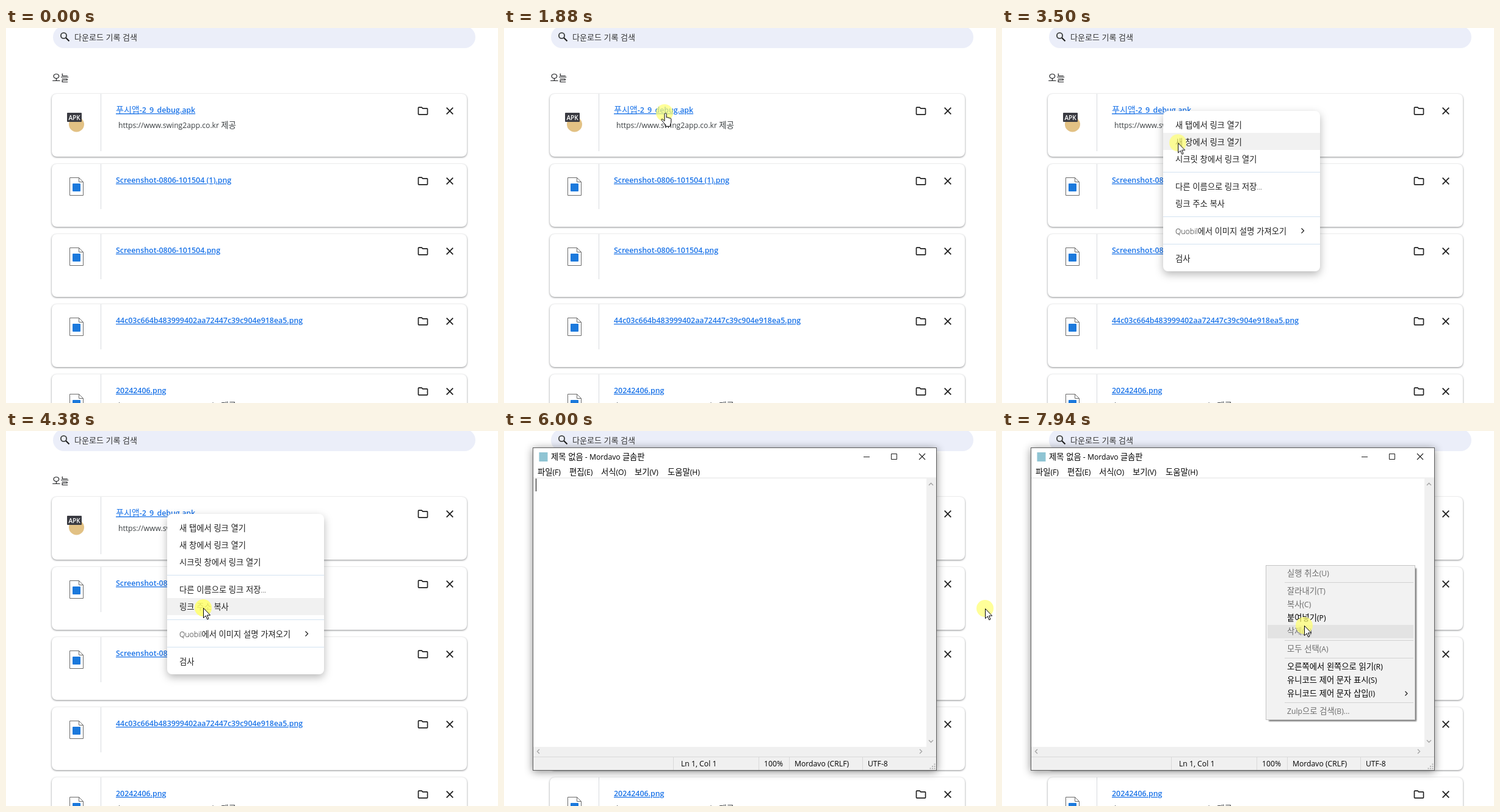
An HTML page for the animation above (8 s loop, 806 by 615 pixels).

```html
<!DOCTYPE html>
<html lang="ko">
<head>
<meta charset="utf-8">
<title>다운로드 기록</title>
<style>
  html, body { margin: 0; width: 100%; height: 100%; overflow: hidden; background: #fff; }
  svg { display: block; width: 100vw; height: 100vh; }
  text { font-family: 'Open Sans', 'Noto Sans', 'Noto Sans CJK KR', sans-serif; font-size: 12.2px; white-space: pre; }
  .ko { font-family: 'Noto Sans CJK KR', 'Noto Sans CJK', 'Noto Sans KR', sans-serif; }
  .light { font-weight: 300; }
  .link { fill: #1a73e8; font-weight: 600; font-size: 12.4px; text-decoration: underline; }
  .link .ko { font-weight: 400; }
  .card { fill: #fff; filter: drop-shadow(0 1px 1.6px rgba(60, 64, 67, .6)); }
  .line { fill: none; stroke: #1f1f1f; }
  .off { fill: #6d6d6d; }

  /* One loop is 8 s, so 1% is 80 ms. */
  .anim { animation: 8s linear infinite; }
  .hard { animation-timing-function: step-end; }
  #linkMenu { animation-name: linkMenu; }
  #linkHover { animation-name: linkHover; }
  #pad { animation-name: pad; }
  #caret { animation-name: caret; }
  #editMenu { animation-name: editMenu; }
  #editHover { animation-name: editHover; }
  #pointer { animation-name: pointer; }
  #arrow { animation-name: arrow; }
  #hand { animation-name: hand; }
  #beam { animation-name: beam; }
  #click { animation-name: click; }

  @keyframes linkMenu {
    0%, 28.85% { opacity: 0; }
    31.2%, 57.1% { opacity: 1; }
    60.95%, 100% { opacity: 0; }
  }
  @keyframes linkHover {
    0% { opacity: 0; transform: translateY(145px); }
    42.55% { opacity: 1; transform: translateY(145px); }
    43.3% { opacity: 1; transform: translateY(172px); }
    44.3% { opacity: 1; transform: translateY(200px); }
    46.5% { opacity: 1; transform: translateY(246px); }
    48.4%, 100% { opacity: 1; transform: translateY(274px); }
  }
  @keyframes pad { 0% { opacity: 0; } 75%, 100% { opacity: 1; } }
  @keyframes caret {
    0% { opacity: 1; }
    76.6% { opacity: 0; }
    83.2% { opacity: 1; }
    89.85%, 100% { opacity: 0; }
  }
  @keyframes editMenu { 0%, 92.2% { opacity: 0; } 93.9%, 100% { opacity: 1; } }
  @keyframes editHover {
    0% { opacity: 0; transform: translateY(223px); }
    95.1% { opacity: 1; transform: translateY(223px); }
    96.3% { opacity: 1; transform: translateY(251px); }
    97% { opacity: 1; transform: translateY(273px); }
    97.6% { opacity: 1; transform: translateY(295px); }
    98.8%, 100% { opacity: 1; transform: translateY(318px); }
  }
  @keyframes pointer {
    0% { opacity: 0; transform: translate(603px, 205px); }
    11.74% { opacity: 0; transform: translate(603px, 205px); }
    11.75% { opacity: 1; transform: translate(603px, 205px); animation-timing-function: cubic-bezier(.3, .2, .35, 1); }
    18.5% { transform: translate(257px, 142px); }
    19.5%, 23.45% { transform: translate(260px, 143px); }
    23.5%, 24.95% { transform: translate(263px, 139px); }
    25.75%, 33.6% { transform: translate(263px, 136px); }
    37.5%, 39.1% { transform: translate(271px, 134px); }
    39.12%, 42.2% { transform: translate(272px, 134px); }
    43.75% { transform: translate(288px, 188px); animation-timing-function: ease-out; }
    50.75%, 74.99% { transform: translate(323px, 290px); }
    75% { transform: translate(788px, 291px); animation-timing-function: ease-in-out; }
    84.37% { transform: translate(431px, 220px); }
    94.5% { transform: translate(431px, 220px); animation-timing-function: ease-in-out; }
    99.25%, 100% { opacity: 1; transform: translate(495px, 319px); }
  }
  @keyframes arrow {
    0% { opacity: 1; }
    18.3% { opacity: 0; }
    28.87% { opacity: 1; }
    78.2% { opacity: 0; }
    92.25%, 100% { opacity: 1; }
  }
  @keyframes hand { 0% { opacity: 0; } 18.3% { opacity: 1; } 28.87%, 100% { opacity: 0; } }
  @keyframes beam { 0% { opacity: 0; } 78.2% { opacity: 1; } 92.25%, 100% { opacity: 0; } }
  @keyframes click {
    0%, 54.7% { opacity: 0; transform: scale(1); }
    54.75% { opacity: .6; transform: scale(1); }
    57% { opacity: .2; transform: scale(1.5); }
    57.1%, 85.1% { opacity: 0; transform: scale(1); }
    85.12% { opacity: .6; transform: scale(1); }
    87.4% { opacity: .2; transform: scale(1.5); }
    87.5%, 100% { opacity: 0; transform: scale(1); }
  }
</style>
</head>
<body>
<script>
// Hangul runs are set slightly larger than the Latin text beside them.
const text = (x, y, s, attrs = '', ko = 13.3) =>
  `<text x="${x}" y="${y}" ${attrs}>` +
  s.replace(/[가-힣]+(?: [가-힣]+)*/g, run => `<tspan class="ko" style="font-size:${ko}px">${run}</tspan>`) +
  '</text>';
const rect = (x, y, w, h, fill, attrs = '') =>
  `<rect x="${x}" y="${y}" width="${w}" height="${h}" fill="${fill}" ${attrs}/>`;
const line = (d, attrs = '') => `<path class="line" d="${d}" ${attrs}/>`;
const cross = (x, y, r, attrs) => line(`M${x - r} ${y - r}l${2 * r} ${2 * r}m0 ${-2 * r}l${-2 * r} ${2 * r}`, attrs);

const folder = (x, y) => `<path transform="translate(${x} ${y}) scale(.8333)" fill="#1f1f1f"
  d="M9.2 6l2 2H20v10H4V6zM10 4H4Q2 4 2 6V18Q2 20 4 20H20Q22 20 22 18V8Q22 6 20 6H12z" fill-rule="evenodd"/>`;

const pageIcon = y =>
  `<path d="M104.5 ${y + .5}h15l7 7v22h-22z" fill="#fff" stroke="#6b6b6b"/>` +
  line(`M119.5 ${y + .5}v7h7`, 'style="stroke:#6b6b6b"') +
  rect(109, y + 10, 13, 13, '#1b79dc', 'rx="1"');

const apkIcon =
  '<circle cx="115.5" cy="158" r="12.5" fill="#e2c184"/>' +
  rect(100, 139, 24, 15, '#3a3b42', 'rx="1"') +
  text(112, 150.5, 'APK', 'fill="#fff" text-anchor="middle" style="font-size:10px;font-weight:600"');

const files = [
  ['푸시앱-2_9_debug.apk', true],
  ['Screenshot-0806-101504 (1).png'],
  ['Screenshot-0806-101504.png'],
  ['44c03c664b483999402aa72447c39c904e918ea5.png'],
  ['20242406.png', true]
];

const card = ([name, hasUrl], i) => {
  const y = 108 + i * 115;
  return rect(75, y, 680, 103, '#fff', 'rx="8" class="card"') +
    rect(155, y, 1, hasUrl ? 94 : 74, '#d9dbdf') +
    (i ? pageIcon(y + (hasUrl ? 32 : 22)) : apkIcon) +
    text(180, y + 31, name, 'class="link"', 14) +
    (hasUrl ? text(184, y + 56, 'https://www.swing2app.co.kr 제공', 'class="light" fill="#3c4043" style="font-weight:400"', 13.5) : '') +
    folder(673, y + 18) + cross(727, y + 28, 5.3, 'stroke-width="1.8"');
};

const page =
  rect(77, -3, 692, 36, '#ebeef9', 'rx="18"') +
  '<circle cx="94.5" cy="12.5" r="4.6" fill="none" stroke="#444746" stroke-width="1.9"/>' +
  line('M98 16l5.5 5.5', 'stroke-width="2.1"') +
  text(112, 19.5, '다운로드 기록 검색', 'class="light" fill="#333"', 13) +
  text(75.5, 87, '오늘', 'class="light" fill="#202124"', 15) +
  files.map(card).join('');

const linkItems = [
  [159, '새 탭에서 링크 열기'], [187, '새 창에서 링크 열기'], [215, '시크릿 창에서 링크 열기'],
  [260, '다른 이름으로 링크 저장...'], [288, '링크 주소 복사'],
  [333, 'Quobil에서 이미지 설명 가져오기'], [378, '검사']
];
const linkMenu = `<g id="linkMenu" class="anim">` +
  rect(264, 136, 257, 263, '#fff', 'rx="8" style="filter:drop-shadow(0 5px 7px rgba(0,0,0,.28))"') +
  rect(264, 0, 257, 28, '#f1f1f1', 'id="linkHover" class="anim hard"') +
  [236, 309, 354].map(y => rect(264, y, 257, 1, '#d3e2f1')).join('') +
  linkItems.map(([y, s]) => text(284, y + 4.5, s, 'class="light" fill="#1f1f1f"')).join('') +
  line('M490.5 328.5l4 4-4 4', 'stroke-width="1.3"') + '</g>';

const chevron = d => line(d, 'style="stroke:#a3a3a3" stroke-width="1.4"');
const grip = [0, 1, 2].flatMap(r => [0, 1, 2].filter(c => c + r > 1)
  .map(c => rect(697.5 + c * 3.5, 545.5 + r * 3.5, 2, 2, '#b4b4b4'))).join('');
const titles = [[55, '파일(F)'], [107, '편집(E)'], [159, '서식(O)'], [214, '보기(V)'], [268, '도움말(H)']];
const status = [[290, 'Ln 1, Col 1'], [426, '100%'], [476, 'Mordavo (CRLF)'], [596, 'UTF-8']];

const padWindow =
  rect(47, 27, 662, 530, '#5c5c5c', 'style="filter:drop-shadow(0 2px 7px rgba(0,0,0,.45))"') +
  rect(48, 28, 660, 528, '#fff') +
  rect(57.5, 35, 14, 15, '#8fc4d3') +
  text(77, 46.5, '제목 없음 - Mordavo 글솜판') +
  line('M589 42.5h10M634.5 37.5h9v9h-9z') + cross(685, 42, 5, 'stroke-width="1.1"') +
  titles.map(([x, s]) => text(x, 71.5, s)).join('') +
  rect(48, 76, 660, 2, '#f0f0f0') +
  rect(692, 78, 16, 440, '#f0f0f0') +
  rect(48, 518, 660, 38, '#f0f0f0') +
  rect(48, 534, 660, 1, '#d9d9d9') +
  [277, 417, 467, 587].map(x => rect(x, 535, 1, 21, '#d9d9d9')).join('') +
  chevron('M696 89l3.5-3.5 3.5 3.5M696 507l3.5 3.5 3.5-3.5M58 522l-3.5 3.5 3.5 3.5M681 522l3.5 3.5-3.5 3.5') +
  status.map(([x, s]) => text(x, 550, s)).join('') + grip +
  rect(52, 78, 1, 21, '#000', 'id="caret" class="anim hard"');

const editItems = [
  [233, '실행 취소(U)', 1], [262, '잘라내기(T)', 1], [284, '복사(C)', 1], [306, '붙여넣기(P)'],
  [328, '삭제(D)', 1], [357, '모두 선택(A)', 1], [386, '오른쪽에서 왼쪽으로 읽기(R)'],
  [408, '유니코드 제어 문자 표시(S)'], [430, '유니코드 제어 문자 삽입(I)'], [459, 'Zulp으로 검색(B)...', 1]
];
const editMenu = `<g id="editMenu" class="anim">` +
  rect(437, 225, 242, 251, '#000', 'opacity=".55" style="filter:blur(1px)"') +
  rect(432.5, 220.5, 244, 253, '#f2f2f2', 'stroke="#c4c4c4"') +
  rect(435, 0, 239, 22, '#e3e3e3', 'id="editHover" class="anim hard"') +
  [248, 343, 372, 445].map(y => rect(463, y, 211, 1, '#d2d2d2')).join('') +
  editItems.map(([y, s, off]) => text(467, y + 4.5, s, off ? 'class="off"' : '')).join('') +
  line('M660.5 427l3.5 3.5-3.5 3.5', 'stroke-width="1.2"') + '</g>';

const pointer = `<g id="pointer" class="anim">
  <circle id="click" class="anim" r="14" fill="#ffff6e"/>
  <circle r="14" fill="#ffff6e" fill-opacity=".7"/>
  <path id="arrow" class="anim hard" fill="#fff" stroke="#000"
    d="M.5 .5v16l3.7-3.5 2.5 5.8 2.3-1-2.5-5.7h5.1z"/>
  <path id="hand" class="anim hard" fill="#fff" stroke="#000" stroke-linejoin="round"
    d="M0 2.3a1.6 1.6 0 0 1 3.2 0V8c0-1 2.7-.8 2.7.6 0-1 2.5-.8 2.5.7 0-1 2.4-.6 2.4 1V15c0 2.2-1.5 3-1.5 5v2.3H1.8V20C0 17.4-3 15-5 11.8-5.6 10.5-4 9.7-3 10.8L0 13.5z"/>
  <path id="beam" class="anim hard line" d="M-1-7.5h3M3-7.5h3M2.5-7V9M-1 8.5h3M3 8.5h3"/>
</g>`;

document.body.innerHTML = `<svg viewBox="0 0 806 615" xmlns="http://www.w3.org/2000/svg">
  ${page}${linkMenu}<g id="pad" class="anim hard">${padWindow}${editMenu}</g>${pointer}</svg>`;
</script>
</body>
</html>
```
